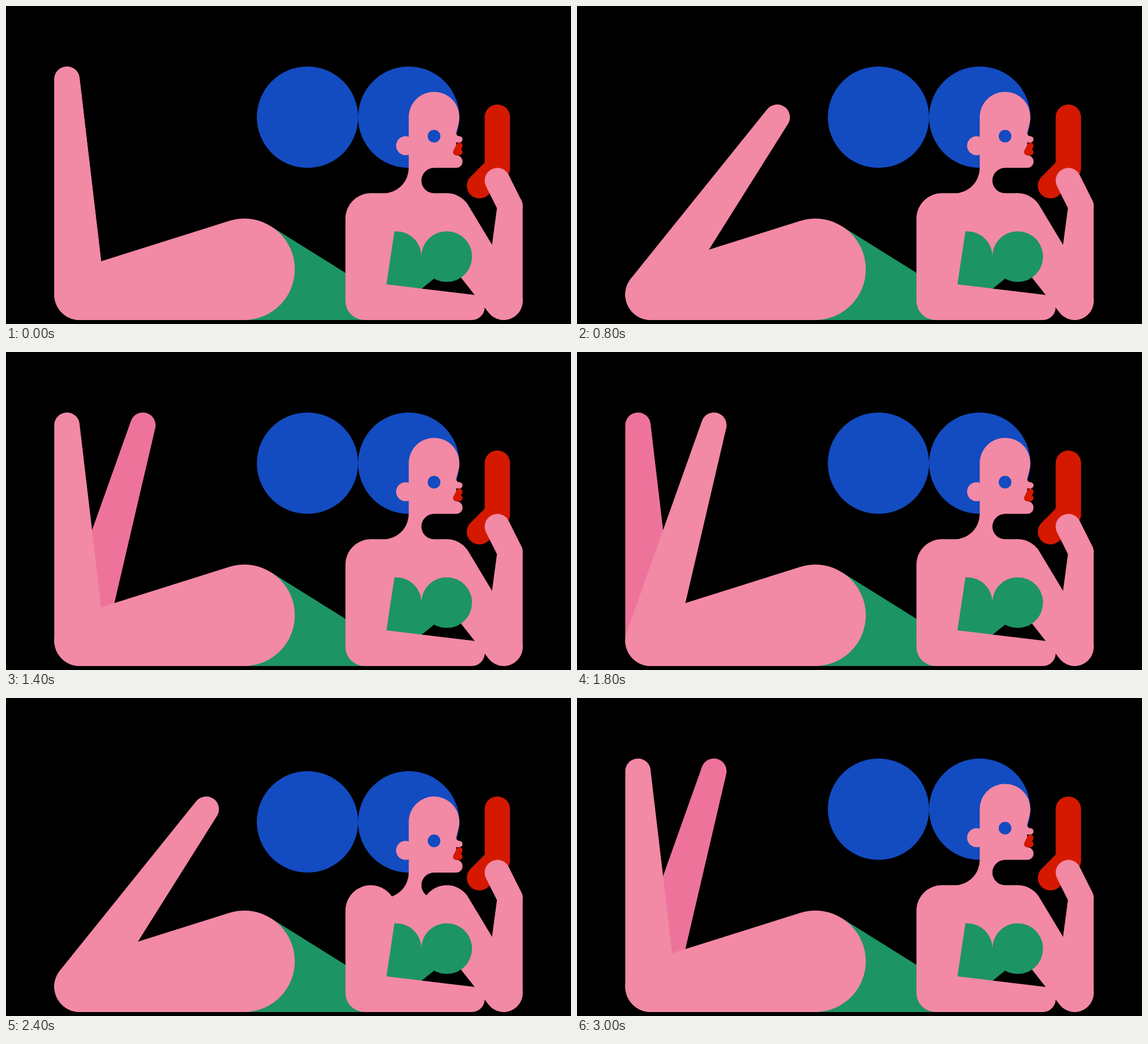
An HTML page with a canvas that plays this animation: 998x561 px, repeating every 3.2 s.

```html
<!DOCTYPE html>
<html lang="en">
<head>
<meta charset="utf-8">
<title>Reclining figure</title>
<style>
html, body { margin: 0; width: 100%; height: 100%; overflow: hidden; background: #000; }
canvas { display: block; width: 998px; height: 561px; }
</style>
</head>
<body>
<canvas id="stage" width="998" height="561"></canvas>
<script>
(() => {
  const ctx = document.getElementById('stage').getContext('2d');
  const PINK = '#f289a5', ROSE = '#ee739b', BLUE = '#134bc1', GREEN = '#1d9463', RED = '#d51900';
  const PI = Math.PI, Q = PI / 2;
  const UNIT = 22.36, LEFT = 85.3, TOP = 106.7;
  const STEP = 200, STEPS = 16;

  // Foot positions in grid units, and which one each leg takes per step
  const FEET = [[1, 1], [7, 1], [12, 4]];
  const FRONT = [0, 1, 2, 2, 2, 1, 0, 0];
  const BACK = [0, 0, 0, 1, 2, 2, 2, 1];

  function fill(color, draw) {
    ctx.fillStyle = color;
    ctx.beginPath();
    draw();
    ctx.fill();
  }

  function lines(...pts) {
    for (const [x, y] of pts) ctx.lineTo(x, y);
  }

  function disc(color, x, y, r) {
    fill(color, () => ctx.arc(x, y, r, 0, 2 * PI));
  }

  // Two discs joined by their outer tangents
  function limb(color, x1, y1, r1, x2, y2, r2) {
    const dx = x2 - x1, dy = y2 - y1;
    const a = Math.atan2(dy, dx);
    const b = Math.acos((r1 - r2) / Math.hypot(dx, dy));
    fill(color, () => {
      ctx.arc(x1, y1, r1, a + b, a - b + 2 * PI);
      ctx.arc(x2, y2, r2, a - b, a + b);
    });
  }

  function calf(color, foot) {
    limb(color, 2, 18, 2, ...FEET[foot], 1);
  }

  function legs(front, back) {
    fill(GREEN, () => lines([17.12, 12.61], [23, 16.28], [24, 16.9], [24.6, 20], [15, 20]));
    calf(ROSE, back);
    limb(PINK, 15, 16, 4, 2, 18, 2);
    calf(PINK, front);
  }

  function head(drop) {
    const tilt = 0.2426;
    ctx.save();
    ctx.translate(0, drop);
    disc(BLUE, 20, 4, 4);
    disc(BLUE, 28, 4, 4);
    disc(PINK, 27.75, 6.25, 0.75);
    fill(PINK, () => {
      lines([25, 12], [25, 10]);
      ctx.arc(26, 8, 2, Q, 0, true);
      ctx.arc(30, 4, 2, PI, tilt);
      ctx.arc(32, 5.25, 0.25, PI + tilt, Q, true);
      ctx.arc(32, 5.75, 0.25, -Q, Q);
      lines([31.75, 6], [31.75, 7]);
      ctx.arc(31.75, 7.5, 0.5, -Q, Q);
      ctx.arc(30, 9, 1, -Q, Q, true);
      lines([31, 10], [31, 12]);
    });
    disc(BLUE, 30, 5.5, 0.5);
    limb(RED, 32, 6.25, 0.25, 31.75, 6.75, 0.25);
    limb(RED, 31.75, 6.75, 0.25, 32, 6.75, 0.25);
    ctx.restore();
  }

  function torso() {
    fill(PINK, () => {
      ctx.arc(25, 12, 2, PI, -0.3);
      lines([31, 11.5], [30, 15], [29, 17.52], [33.22, 18.02], [34, 18.1]);
      ctx.arc(33, 19, 1, 0, Q);
      ctx.arc(24.5, 18.5, 1.5, Q, PI);
    });
  }

  function arm() {
    limb(RED, 35, 4, 1, 35, 8, 1);
    limb(RED, 35, 8, 1, 35 - Math.SQRT2, 8 + Math.SQRT2, 1);
    limb(PINK, 31, 12, 2, 35.5, 18.5, 1.5);
    limb(PINK, 36, 11, 1, 35.5, 18.5, 1.5);
    limb(PINK, 35, 9, 1, 36, 11, 1);
  }

  function bodice() {
    fill(GREEN, () => {
      lines([26.87, 13], [27, 13]);
      ctx.arc(27, 15, 2, -Q, 0);
      lines([31, 15], [30, 16.74], [29.03, 17.52], [26.24, 17.19]);
    });
    disc(GREEN, 31, 15, 2);
  }

  function render(ms) {
    const i = Math.floor(ms / STEP) % STEPS;
    const nod = i === 12 || i === 13;
    ctx.setTransform(1, 0, 0, 1, 0, 0);
    ctx.fillStyle = '#000';
    ctx.fillRect(0, 0, 998, 561);
    ctx.setTransform(UNIT, 0, 0, UNIT, LEFT, TOP);
    legs(FRONT[i % 8], BACK[i % 8]);
    head(nod ? 1 : 0);
    torso();
    arm();
    bodice();
  }

  const start = performance.now();
  function tick(now) {
    render(Math.max(0, now - start));
    requestAnimationFrame(tick);
  }
  tick(start);
})();
</script>
</body>
</html>
```
